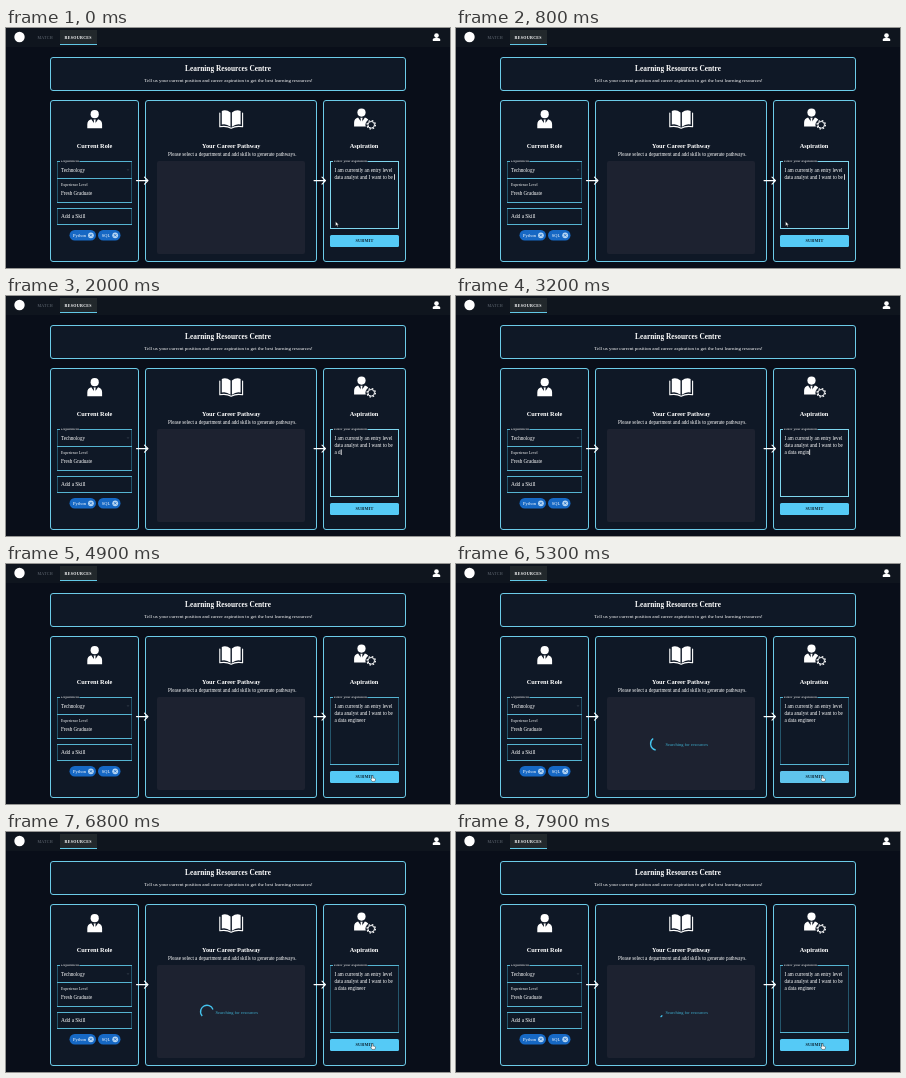
An HTML page that plays this animation: 444 by 240 pixels, repeating every 8 s.

```html
<!DOCTYPE html>
<html lang="en">
<head>
<meta charset="utf-8">
<title>Learning Resources</title>
<style>
  html, body { margin: 0; width: 100%; height: 100%; overflow: hidden; background: #090e19; }
  svg { display: block; }
  text { font-family: "Liberation Serif", "Times New Roman", serif; font-size: 5.1px; fill: #fff; }
  .bold { font-weight: bold; font-size: 6.3px; }
  .mid { text-anchor: middle; }
  .label { font-size: 3.8px; }
  .tab { font-size: 4px; font-weight: bold; letter-spacing: .33px; }
  .card { fill: #0f1826; stroke: #6ccbe8; }
  .field { fill: none; stroke: #55b4d2; }
  .side { fill: none; stroke: #24566c; }
  .chip { fill: #1668c4; }
  .icon { fill: #fff; }
  .line { fill: none; stroke: #fff; stroke-width: 1.1; stroke-linecap: round; stroke-linejoin: round; }
  #typed { white-space: pre; }
</style>
</head>
<body>
<svg width="444" height="240" viewBox="0 0 444 240">
  <defs>
    <clipPath id="cut"><rect x="44" y="132.5" width="356" height="5"/></clipPath>
    <g id="person">
      <circle cy="-6" r="4.1"/>
      <path d="M-7.4 8V4Q-7.4 0 -3.4 -1L0 4L3.4 -1Q7.4 0 7.4 4V8Z"/>
      <path d="M-1.2 -.8H1.2L.7 .7L1.3 4L0 6L-1.3 4L-.7 .7Z"/>
    </g>
    <path id="arrow" class="line" d="M0 0H11.5M8 -3.5L11.5 0L8 3.5"/>
    <g id="cross">
      <circle r="2.9" fill="#b4d5f4"/>
      <path d="M-1.1 -1.1L1.1 1.1M1.1 -1.1L-1.1 1.1" stroke="#1668c4" stroke-width=".8"/>
    </g>
  </defs>

  <rect width="444" height="240" fill="#090e19"/>

  <!-- top bar -->
  <rect width="444" height="19" fill="#0f151e"/>
  <circle class="icon" cx="13.5" cy="9" r="5.2"/>
  <text class="tab" x="31.4" y="10.8" style="fill:#68707a;font-weight:normal">MATCH</text>
  <rect x="54" y="2" width="37" height="14" fill="#22282c"/>
  <rect x="54" y="16" width="37" height="1" fill="#62c8e6"/>
  <text class="tab" x="58.5" y="10.8">RESOURCES</text>
  <g class="icon"><circle cx="430.5" cy="7.6" r="2.3"/><path d="M426.8 13V11.6Q427 9.8 430.5 9.8T434.2 11.6V13Z"/></g>

  <!-- header -->
  <rect class="card" x="44.5" y="29.5" width="355" height="33" rx="2.5"/>
  <text class="bold mid" x="222" y="43" style="font-size:7.35px">Learning Resources Centre</text>
  <text class="mid" x="222.5" y="53.7" style="font-size:5.02px">Tell us your current position and career aspiration to get the best learning resources!</text>

  <!-- cards -->
  <rect class="card" x="44.5" y="72.5" width="88" height="161" rx="2.5"/>
  <rect class="card" x="139.5" y="72.5" width="171" height="161" rx="2.5"/>
  <rect class="card" x="317.5" y="72.5" width="82" height="161" rx="2.5"/>

  <!-- current role -->
  <use href="#person" class="icon" x="88.7" y="92.2"/>
  <text class="bold mid" x="88.5" y="119.8">Current Role</text>
  <path class="side" d="M51.5 133V174M125.5 133V174M51.5 180V197M125.5 180V197"/>
  <path class="field" d="M51 133.5H54M73.5 133.5H126M51 150.5H126M51 174.5H126M51 180.5H126M51 196.5H126"/>
  <text class="label" x="55" y="133.9" clip-path="url(#cut)">Department</text>
  <text x="55" y="143.8">Technology</text>
  <path d="M120.5 141.3H123.5L122 142.9Z" fill="#2a3442"/>
  <text class="label" x="55" y="157.8">Experience Level</text>
  <text x="55" y="167">Fresh Graduate</text>
  <text x="55" y="190" style="font-size:5.4px">Add a Skill</text>
  <rect class="chip" x="63.5" y="202" width="26.5" height="10.5" rx="5.2"/>
  <rect class="chip" x="92" y="202" width="22.5" height="10.5" rx="5.2"/>
  <text x="67" y="208.8" style="font-size:4.6px">Python</text>
  <text x="95.8" y="208.8" style="font-size:4.4px">SQL</text>
  <use href="#cross" x="84.9" y="207.3"/>
  <use href="#cross" x="109.2" y="207.3"/>

  <!-- pathway -->
  <g transform="translate(225.2 91.5)">
    <path class="icon" d="M-.7 -7Q-5 -10.5 -9.4 -8.6V5Q-5 3.8 -.7 7.2ZM.7 -7Q5 -10.5 9.4 -8.6V5Q5 3.8 .7 7.2Z"/>
    <path class="line" d="M-11.4 -6.5V7.3Q-5 6 0 8.7Q5 6 11.4 7.3V-6.5"/>
  </g>
  <text class="bold mid" x="225.3" y="119.8">Your Career Pathway</text>
  <text class="mid" x="226.2" y="128.2">Please select a department and add skills to generate pathways.</text>
  <rect x="151" y="133" width="148" height="93" rx="2" fill="#1d2230"/>
  <g id="loader">
    <circle id="ring" cx="44" cy="44" r="20.2" fill="none" stroke="#45c4ee" stroke-width="4.2"/>
    <text x="209.5" y="181.6" style="font-size:4.5px;fill:#3fb0d0">Searching for resources</text>
  </g>

  <!-- aspiration -->
  <use href="#person" class="icon" x="355.5" y="90.6"/>
  <g transform="translate(365.2 96.8)">
    <circle r="5.8" fill="#0f1826"/>
    <circle r="4.2" fill="none" stroke="#fff" stroke-width="1.2" stroke-dasharray="1.65"/>
    <circle r="3.3" fill="none" stroke="#fff"/>
  </g>
  <text class="bold mid" x="358" y="119.8">Aspiration</text>
  <path id="sides" class="side" d="M324.5 133V201M392.5 133V201"/>
  <path id="edges" class="field" d="M324 133.5H327M361.5 133.5H393M324 200.5H393"/>
  <text class="label" x="328" y="133.9" style="font-size:3.9px" clip-path="url(#cut)">Enter your aspiration</text>
  <text x="328.5" y="143.6">I am currently an entry level</text>
  <text x="328.5" y="150.8">data analyst and I want to be</text>
  <text id="typed" x="328.5" y="158"></text>
  <rect id="caret" width=".8" height="5.6" fill="#fff"/>
  <rect id="button" x="324" y="207" width="69" height="12" rx="1.5"/>
  <text class="tab mid" x="358.5" y="214.4" style="font-size:4.3px;letter-spacing:.2px;fill:#0d2433">SUBMIT</text>

  <use href="#arrow" x="130.5" y="152.6"/>
  <use href="#arrow" x="308" y="152.6"/>

  <g id="mouse" stroke="#111" stroke-width=".4" fill="#fff">
    <path id="pointer" d="M0 0V4.6L1.1 3.6L1.9 5.3L2.7 4.9L1.9 3.3H3.4Z"/>
    <path id="hand" d="M-.6 .2Q0 -.5 .6 .2V2L2.6 2.5Q3.2 2.7 3 3.6L2.5 5.4H-.5L-1.8 3.3Q-1.5 2.5 -.6 3.1Z"/>
  </g>
</svg>

<script>
const LOOP = 8000, HIDE = 1300, SHOW = 4100, BLUR = 4850, CLICK = 4975;
const WORDS = "a data engineer";
// [time, letters typed]
const KEYS = [[1400, 1], [1800, 2], [2000, 3], [2100, 4], [2200, 6], [2600, 7], [2700, 8],
  [3000, 9], [3100, 11], [3200, 12], [3400, 13], [3600, 14], [3800, 15]];
// [time, x, y]
const PATH = [[SHOW, 329.5, 193.5], [4400, 351, 233], [4750, 366.5, 212]];

const $ = id => document.getElementById(id);
const [typed, caret, sides, edges, button, loader, ring, mouse, pointer, hand] =
  ["typed", "caret", "sides", "edges", "button", "loader", "ring", "mouse", "pointer", "hand"].map($);
const show = (el, on) => el.setAttribute("visibility", on ? "inherit" : "hidden");
const set = (el, attrs) => { for (const k in attrs) el.setAttribute(k, attrs[k]); };
const smooth = u => u * u * (3 - 2 * u);
const mix = (a, b, u) => a + (b - a) * u;

// CSS ease-in-out, cubic-bezier(.42, 0, .58, 1)
function easeInOut(x) {
  let lo = 0, hi = 1;
  for (let i = 0; i < 20; i++) {
    const s = (lo + hi) / 2;
    const bx = 3 * s * (1 - s) * (.42 * (1 - s) + .58 * s) + s ** 3;
    if (bx < x) lo = s; else hi = s;
  }
  return smooth(lo);
}

function drawTyping(t) {
  const last = KEYS.filter(k => k[0] <= t).pop();
  const n = last ? last[1] : 0;
  typed.textContent = WORDS.slice(0, n);
  set(caret, n
    ? { x: 328.7 + typed.getComputedTextLength(), y: 153.4 }
    : { x: 388, y: 146.2 });
  const blinkOff = (t >= 300 && t < 800) || (t >= 4300 && t < 4800);
  show(caret, t < BLUR && !blinkOff);
}

function drawMouse(t) {
  show(mouse, t < HIDE || t >= SHOW);
  let [, x, y] = PATH[0];
  for (let i = 1; i < PATH.length; i++) {
    const [a, ax, ay] = PATH[i - 1], [b, bx, by] = PATH[i];
    if (t >= a) {
      const u = smooth(Math.min(1, (t - a) / (b - a)));
      x = mix(ax, bx, u);
      y = mix(ay, by, u);
    }
  }
  const over = x > 324 && x < 393 && y > 207 && y < 219;
  show(pointer, !over);
  show(hand, over);
  mouse.setAttribute("transform", `translate(${x} ${y})`);
}

function drawLoader(t) {
  show(loader, t >= CLICK);
  if (t < CLICK) return;
  const p = (t - CLICK) / 1400 % 1;
  const grow = easeInOut(Math.min(1, p * 2));
  const slide = easeInOut(Math.max(0, p * 2 - 1));
  set(ring, {
    "stroke-dasharray": `${mix(1, 100, grow)} 200`,
    "stroke-dashoffset": mix(mix(0, -15, grow), -125, slide),
    transform: `translate(201 179.7) scale(.318) rotate(${p * 360}) translate(-44 -44)`
  });
}

function draw(t) {
  drawTyping(t);
  drawMouse(t);
  drawLoader(t);
  const focused = t < BLUR;
  sides.style.stroke = focused ? "#7fd6ee" : "#24566c";
  edges.style.stroke = focused ? "#7fd6ee" : "#55b4d2";
  button.setAttribute("fill", t >= CLICK && t < 5600 ? "#5fc4ec" : "#55caf6");
}

const start = performance.now();
function tick() {
  draw((performance.now() - start) % LOOP);
  requestAnimationFrame(tick);
}
tick();
</script>
</body>
</html>
```
